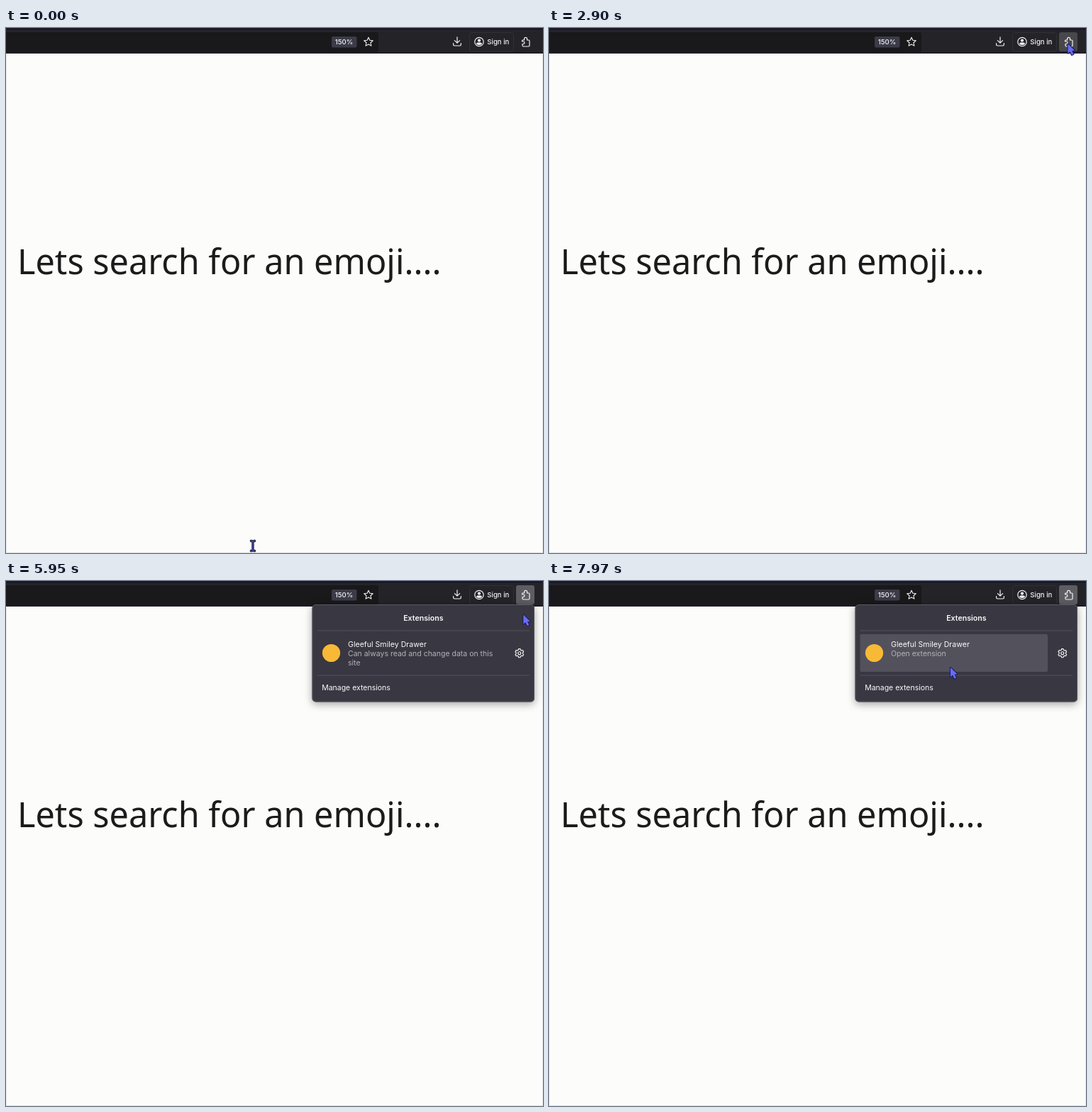
These frames come from a looping animation (757x740 px, 7.99 s). An HTML page with a canvas:

```html
<!DOCTYPE html>
<html lang="en">
<head>
<meta charset="utf-8">
<title>Extension menu</title>
<style>
  html, body { margin: 0; width: 100%; height: 100%; overflow: hidden; background: #fcfcfb; }
  canvas { display: block; width: 757px; height: 740px; }
</style>
</head>
<body>
<canvas id="stage"></canvas>
<script>
const W = 757, H = 740, LOOP = 7990;
const UI = 'Inter, "Open Sans", sans-serif';
const canvas = document.getElementById('stage');
const ctx = canvas.getContext('2d');
const ratio = window.devicePixelRatio || 1;
canvas.width = W * ratio;
canvas.height = H * ratio;

// Pointer path: time, x, y
const PATH = [
  [20, 348, 730], [680, 657, 426], [730, 670, 318], [1000, 682, 200],
  [1560, 697, 65], [1680, 700, 58], [2120, 713, 36], [2380, 731.5, 22.5],
  [5700, 731.5, 22.5], [6450, 725, 97.5], [6830, 725, 97.5],
  [7250, 625, 106], [7700, 572, 120], [7900, 566, 122]
];
const ARROW_FROM = 2200, HOVER_FROM = 2380, PRESS = 4770, OPEN = 4880, OPEN_TIME = 180;
// Times at which the text caret switches on or off
const BLINKS = [1680, 2440, 3670, 4900, 6130, 7360];

const STAR = starPath(511, 19.8, 6.6, 3.1);
const PUZZLE = new Path2D('M728 17 h2.6 v-1.6 a2 2 0 0 1 4 0 v1.6 h2.2 q1.2 0 1.2 1.2 v6.6 q0 1.2 -1.2 1.2 h-7.6 q-1.2 0 -1.2 -1.2 v-2.3 h1.2 a1.7 1.7 0 0 0 0 -3.5 h-1.7 v-.8 q0 -1.2 1 -1.2 z');
const ARROW = new Path2D('M0 0 L0 13.2 L3 10.6 L5.4 15.6 L8 14.4 L5.7 9.6 L9.6 9.3 Z');
const BEAM = new Path2D('M-2.6 -7 Q-.4 -7 0 -5.6 Q.4 -7 2.6 -7 M0 -5.6 V5.6 M-2.6 7 Q-.4 7 0 5.6 Q.4 7 2.6 7');
const GEAR = gearPath(6.2, 4.8);

function starPath(x, y, outer, inner) {
  const p = new Path2D();
  for (let i = 0; i < 10; i++) {
    const a = -Math.PI / 2 + i * Math.PI / 5, r = i % 2 ? inner : outer;
    p.lineTo(x + r * Math.cos(a), y + r * Math.sin(a));
  }
  p.closePath();
  return p;
}

function gearPath(outer, inner) {
  const p = new Path2D();
  for (let i = 0; i < 6; i++) {
    const a = -Math.PI / 2 + i * Math.PI / 3;
    for (const [d, r] of [[-.33, inner], [-.2, outer], [.2, outer], [.33, inner]])
      p.lineTo(r * Math.cos(a + d), r * Math.sin(a + d));
  }
  p.closePath();
  p.moveTo(2, 0);
  p.arc(0, 0, 2, 0, 2 * Math.PI);
  return p;
}

function box(x, y, w, h, fill, r = 0, line) {
  ctx.beginPath();
  ctx.roundRect(x, y, w, h, r);
  if (fill) { ctx.fillStyle = fill; ctx.fill(); }
  if (line) { ctx.strokeStyle = line; ctx.lineWidth = 1; ctx.stroke(); }
}

function label(text, x, y, size, color, weight = 400, align = 'left', family = UI) {
  ctx.font = `${weight} ${size}px ${family}`;
  ctx.textAlign = align;
  ctx.fillStyle = color;
  ctx.fillText(text, x, y);
}

function stroke(path, color, width) {
  ctx.strokeStyle = color;
  ctx.lineWidth = width;
  ctx.stroke(path);
}

function disc(x, y, r, color) {
  ctx.beginPath();
  ctx.arc(x, y, r, 0, 2 * Math.PI);
  ctx.fillStyle = color;
  ctx.fill();
}

function pointerAt(t) {
  if (t <= PATH[0][0]) return PATH[0].slice(1);
  for (let i = 1; i < PATH.length; i++) {
    const [t0, x0, y0] = PATH[i - 1], [t1, x1, y1] = PATH[i];
    if (t < t1) {
      const p = (t - t0) / (t1 - t0);
      return [x0 + (x1 - x0) * p, y0 + (y1 - y0) * p];
    }
  }
  return PATH[PATH.length - 1].slice(1);
}

function drawPage(t) {
  box(0, 0, W, H, '#fcfcfb');
  box(0, 36, 1, 704, '#e6e6e9');
  box(756, 36, 1, 704, '#e6e6e9');
  box(0, 739, W, 1, '#e2e2e5');
  label('Lets search for an emoji....', 16, 347, 48.6, '#1b1b1b', 400, 'left', '"Noto Sans", "Open Sans", sans-serif');
  if (BLINKS.filter(b => b <= t).length % 2) box(16, 295, 2.5, 66, '#1b1b1b');
}

function drawToolbar(t) {
  const ink = '#f4f4f8';
  box(0, 0, W, 36, '#232328');
  box(0, 0, W, 3, '#1a1926');
  box(0, 3, W, 2, '#25242e');
  box(0, 6, 525, 28, '#19191c', [0, 3, 3, 0]);
  box(0, 34.5, W, 1.5, '#1b1a25');

  box(459, 12, 35.5, 15.5, '#3c3b48', 2);
  label('150%', 476.5, 23.2, 9.6, ink, 500, 'center');
  stroke(STAR, ink, 1.1);
  stroke(new Path2D('M636 12.8 V21 M632.4 17.6 L636 21.2 L639.6 17.6 M630.6 21.5 V23.3 Q630.6 25 632.3 25 H639.7 Q641.4 25 641.4 23.3 V21.5'), ink, 1.2);

  box(653.5, 6.5, 62, 26.5, null, 3, '#303037');
  ctx.beginPath();
  ctx.arc(667, 19.5, 6.2, 0, 2 * Math.PI);
  ctx.strokeStyle = ink;
  ctx.lineWidth = 1.2;
  ctx.stroke();
  disc(667, 17.6, 2.1, ink);
  ctx.fill(new Path2D('M663 22.6 Q663 20.6 665 20.6 H669 Q671 20.6 671 22.6 Q669.4 24.1 667 24.1 Q664.6 24.1 663 22.6 Z'));
  label('Sign in', 678.3, 23.1, 9.6, ink, 500);

  if (t >= HOVER_FROM) box(719, 6, 26, 27, t < PRESS ? '#47474c' : '#5d5d62', 3);
  stroke(PUZZLE, ink, 1.2);
}

function drawMenu(t, [x, y]) {
  if (t < OPEN) return;
  const p = Math.min(1, (t - OPEN) / OPEN_TIME);
  const shown = 1 - (1 - p) ** 6;
  const onRow = y > 75 && y < 128 && x < 703;
  const onGear = y > 87 && y < 115 && x > 710;
  const ink = '#fafafc', soft = '#b3b2ba';

  ctx.save();
  ctx.globalAlpha = shown;
  ctx.translate(0, -70 * (1 - shown));
  ctx.shadowColor = 'rgba(0,0,0,.36)';
  ctx.shadowBlur = 12 * ratio;
  ctx.shadowOffsetY = 3 * ratio;
  box(431.5, 33, 313.5, 137.5, '#393741', 5);
  ctx.shadowColor = 'transparent';
  box(432, 33.5, 312.5, 136.5, null, 5, '#5a5863');
  box(438.5, 69.5, 299.5, 1, '#55535d');
  box(438.5, 132.5, 299.5, 1, '#55535d');
  if (onRow) box(438.5, 75, 264.5, 53, '#53515b', 2);
  if (onGear) box(710, 88, 28, 27.5, '#53515b', 2);

  label('Extensions', 588.3, 55.9, 10.6, ink, 600, 'center');
  disc(458.5, 101.5, 12.6, '#f8b936');
  label('Gleeful Smiley Drawer', 482, 92.7, 10.6, ink);
  const lines = onRow ? ['Open extension'] : onGear ? ['Manage extension']
    : ['Can always read and change data on this', 'site'];
  lines.forEach((s, i) => label(s, 482, 105.8 + 13 * i, 10.5, soft));
  label('Manage extensions', 445.2, 154.3, 10.5, ink);

  ctx.translate(723.8, 101.7);
  stroke(GEAR, ink, 1.1);
  ctx.restore();
}

function drawPointer(t, [x, y]) {
  ctx.save();
  ctx.translate(x, y);
  if (t < ARROW_FROM) {
    stroke(BEAM, '#1d1d45', 3.4);
    stroke(BEAM, '#5355ad', 1.1);
  } else {
    stroke(ARROW, '#1b1b55', 2);
    ctx.fillStyle = '#686cf6';
    ctx.fill(ARROW);
  }
  ctx.restore();
}

function frame() {
  const t = performance.now() % LOOP;
  const pointer = pointerAt(t);
  ctx.setTransform(ratio, 0, 0, ratio, 0, 0);
  ctx.lineCap = ctx.lineJoin = 'round';
  drawPage(t);
  drawToolbar(t);
  drawMenu(t, pointer);
  drawPointer(t, pointer);
  requestAnimationFrame(frame);
}
frame();
</script>
</body>
</html>
```
